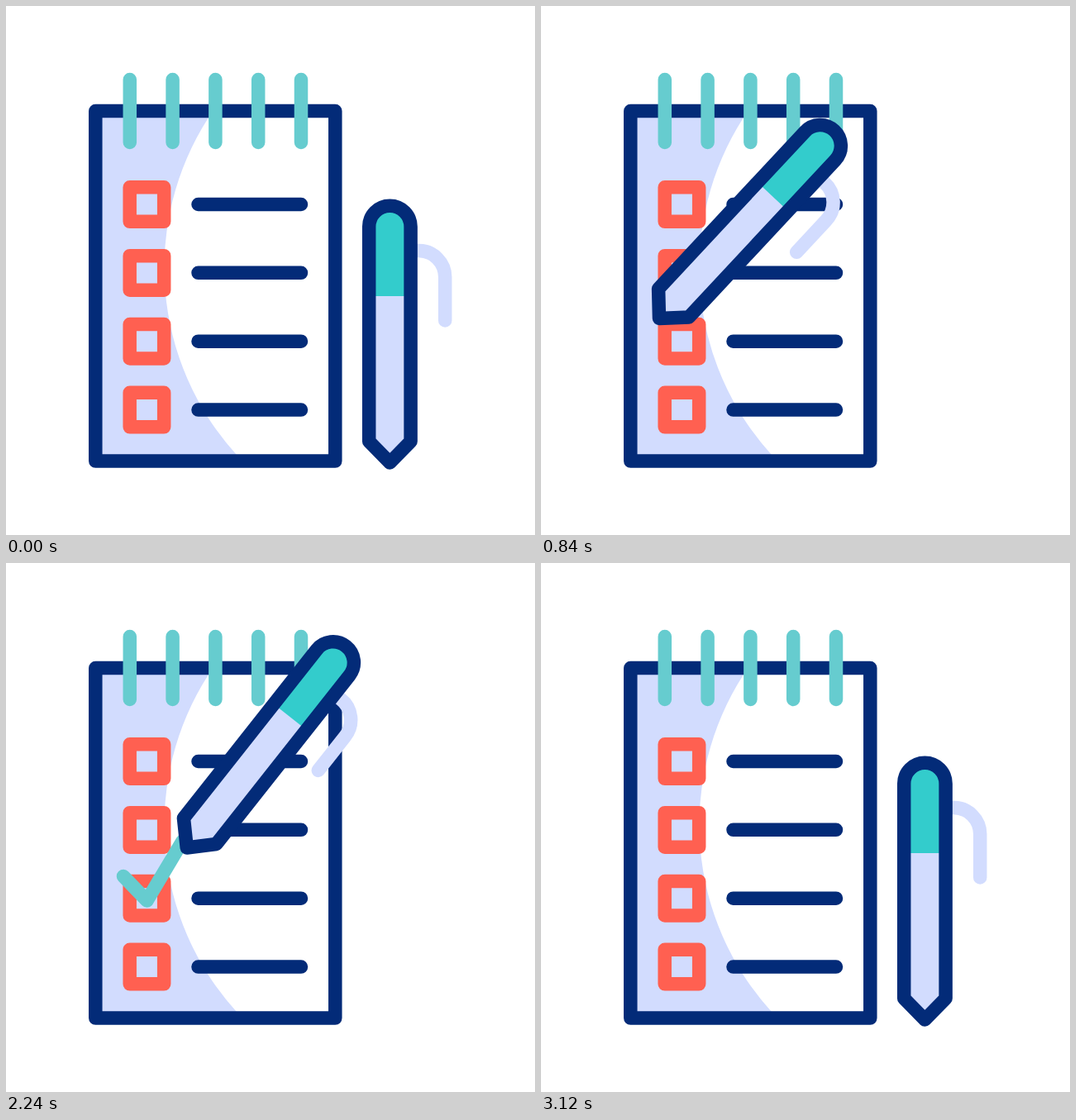
These frames come from a looping animation (640x640 px, 3280 ms). An HTML page:

```html
<!DOCTYPE html>
<html lang="en">
<head>
<meta charset="utf-8">
<title>Checklist</title>
<style>
  html, body { margin: 0; height: 100%; overflow: hidden; background: #fff; }
  svg { display: block; width: 100%; height: 100%; }
  .line { fill: none; stroke-width: 16.5; stroke-linecap: round; stroke-linejoin: round; }
  .navy { stroke: #032b78; }
  .teal { stroke: #66cccf; }
  .red { stroke: #ff6051; }
  .pale { stroke: #d2dcfe; }
</style>
</head>
<body>
<svg viewBox="0 0 640 640">
  <path fill="#d2dcfe" d="M245 135A336 336 0 0 0 279 543H108V135Z"/>
  <path class="line navy" d="M108.3 127H398.3V550.6H108.3Z"/>
  <path id="rings" class="line teal"/>
  <path id="boxes" class="line red"/>
  <path id="rows" class="line navy"/>
  <path id="check" class="line teal" pathLength="100" d="M142 379L170.5 408.5L213.5 336.5"/>
  <!-- pen, with its tip at the origin -->
  <g id="pen">
    <path class="line pale" d="M28 -256.5H34.5A32 32 0 0 1 66.8 -224V-172"/>
    <path fill="#d2dcfe" d="M-25 -202H25V-25.5L0 0L-25 -25.5Z"/>
    <path fill="#33cccc" d="M-25 -201.5V-285.5A25 25 0 0 1 25 -285.5V-201.5Z"/>
    <path class="line navy" d="M-25.2 -25.7V-285.5A25.2 25.2 0 0 1 25.2 -285.5V-25.7L0 0Z"/>
  </g>
</svg>
<script>
const LOOP = 3280, STEP = 40;
const $ = id => document.getElementById(id);
const repeat = (n, f) => Array.from({ length: n }, (_, i) => f(i)).join('');
const mix = (a, b, k) => a + (b - a) * k;
const clamp = x => Math.min(1, Math.max(0, x));

$('rings').setAttribute('d', repeat(5, i => `M${149.8 + i * 51.8} 89V165`));
$('boxes').setAttribute('d', repeat(4, i => `M149.7 ${219.3 + i * 82.85}h41.5v41.5h-41.5z`));
$('rows').setAttribute('d', repeat(4, i => `M232.5 ${240 + i * 82.85}H357`));

// cubic-bezier(.376, 0, .476, 1)
function ease(x) {
  let lo = 0, hi = 1, u = 0.5;
  for (let i = 0; i < 24; i++) {
    u = (lo + hi) / 2;
    const v = 1 - u;
    if (3 * u * v * v * 0.376 + 3 * u * u * v * 0.476 + u ** 3 < x) lo = u; else hi = u;
  }
  return u * u * (3 - 2 * u);
}
const span = (t, from, to) => ease(clamp((t - from) / (to - from)));

// Tip paths are straight lines or cubic curves, with the lean in degrees.
const moves = [
  { from: 0, to: 840, path: [[464.4, 552.5], [361, 364], [254, 399], [143, 378]], lean: [0, 43] },
  { from: 1080, to: 1330, path: [[143, 378], [170.5, 411]], lean: [43, 39] },
  { from: 1330, to: 1700, path: [[170.5, 411], [215.5, 338.5]], lean: [39, 35.2] },
  { from: 1700, to: 1920, path: [[215.5, 338.5], [217, 343]], lean: [35.2, 38.6] },
  { from: 2200, to: 2900, path: [[217, 343], [291, 406], [373, 476], [464.4, 552.5]], lean: [38.6, 0] }
];

function along(points, k) {
  while (points.length > 1)
    points = points.slice(1).map((p, i) => p.map((v, j) => mix(points[i][j], v, k)));
  return points[0];
}

function draw(t) {
  const move = moves.filter(m => t >= m.from).pop();
  const k = span(t, move.from, move.to);
  const [x, y] = along(move.path, k);
  $('pen').setAttribute('transform', `translate(${x} ${y}) rotate(${mix(...move.lean, k)})`);

  const corner = 33;
  const end = corner * span(t, 1080, 1330) + (100 - corner) * span(t, 1330, 1700);
  const start = 100 * span(t, 2680, 3120);
  const check = $('check').style;
  check.visibility = end - start > 0.01 ? 'visible' : 'hidden';
  check.strokeDasharray = `${Math.max(0, end - start)} 300`;
  check.strokeDashoffset = -start;
}

let begin;
function frame(now) {
  begin ??= now;
  draw(Math.floor((now - begin) % LOOP / STEP) * STEP);
  requestAnimationFrame(frame);
}
draw(0);
requestAnimationFrame(frame);
</script>
</body>
</html>
```
